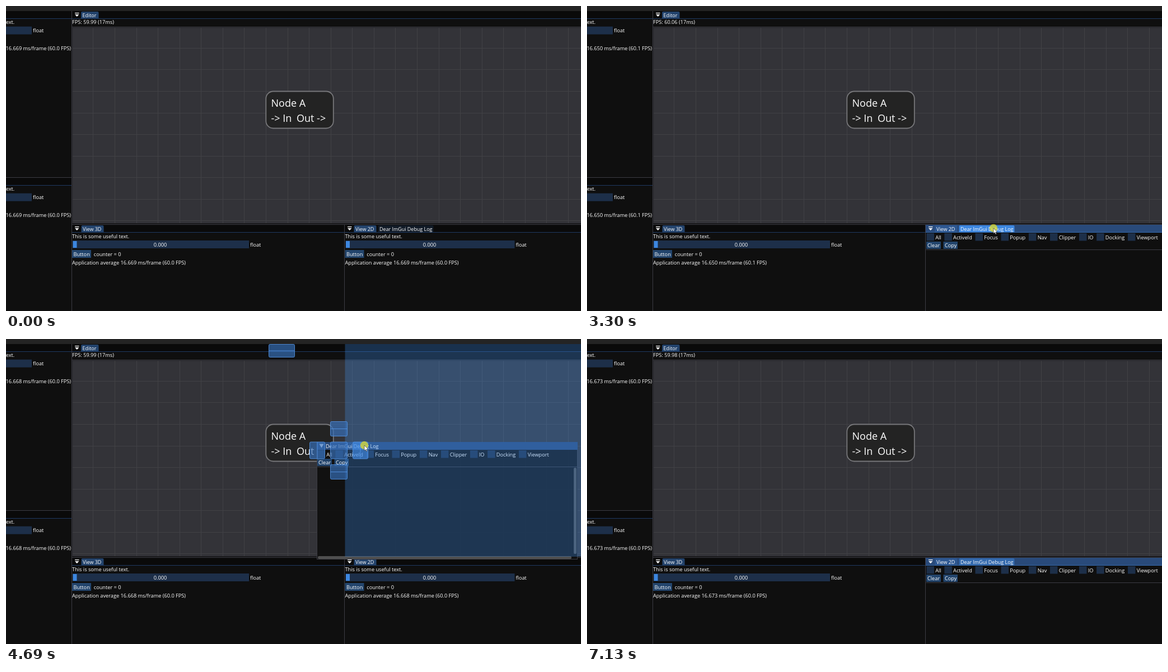
Animation of 1027 by 545 pixels, one loop 7210 ms. Source, as an HTML page with a canvas:

```html
<!DOCTYPE html>
<html lang="en">
<head>
<meta charset="utf-8">
<title>Docking demo</title>
<style>
  html, body { margin: 0; width: 100%; height: 100%; overflow: hidden; background: #0f0f0f; }
  canvas { display: block; }
</style>
</head>
<body>
<canvas id="stage" width="1027" height="545"></canvas>
<script>
const g = document.getElementById('stage').getContext('2d');
const W = 1027, H = 545, LOOP = 7210;
const BG = '#0f0f0f', BAR = '#0a0a0a', BORDER = '#3b3b43', FRAME = '#1d2f49', BUTTON = '#23456d';
const TAB = '#23436c', LINE = '#1e3961', FOCUS = '#294a7a', ACTIVE = '#3369ad', HOVER = '#3d87e0';
const LOG = 'Dear ImGui Debug Log', TAB_SIZE = 8.95, GRID = 38.57;

// When things happen, in ms
const showLogAt = 1250, showViewAt = 1850, showLogAgainAt = 2700, undockAt = 3740, dropAt = 6400;
const LAG = 60;     // the pointer trails the dragged window
const TRAVEL = 450; // longest pointer move

// Pointer stops: arrival time, x, y
const stops = [
  [0, 985, 570], [900, 722, 398], [1990, 647, 394], [2650, 726, 397], [4135, 716, 392],
  [4285, 740, 370], [4690, 640, 190], [5210, 698, 387], [5450, 720, 439], [6000, 838, 496],
  [6860, 870, 570]
];
// Measured frame durations: time, ms per frame
const readings = [
  [0, 16.669], [1990, 17.533], [3300, 16.65], [4210, 16.684], [4690, 16.6684],
  [5330, 17.0724], [7130, 16.673]
];

const mix = (a, b, u) => a + (b - a) * u;
const ease = u => u * u * (3 - 2 * u);

function around(keys, t) {
  const i = keys.findIndex(k => k[0] > t);
  return i < 0 ? [keys.at(-1), keys.at(-1)] : [keys[i - 1], keys[i]];
}

function pointerAt(t) {
  const [a, b] = around(stops, t);
  const travel = Math.min(TRAVEL, b[0] - a[0]) || 1;
  const u = ease(Math.min(1, Math.max(0, 1 - (b[0] - t) / travel)));
  return [mix(a[1], b[1], u), mix(a[2], b[2], u)];
}

// The screen refreshes at an even pace between two readings
function refresh(t) {
  const [a, b] = around(readings, t), span = b[0] - a[0];
  if (!span) return [a[0], a[1]];
  const steps = Math.round(span / 69.2), u = Math.floor((t - a[0]) / span * steps) / steps;
  return [a[0] + u * span, mix(a[1], b[1], u)];
}

function rect(x, y, w, h, color) {
  g.fillStyle = color;
  g.fillRect(x, y, w, h);
}

function rounded(x, y, w, h, r, fill, stroke, width = 1) {
  g.beginPath();
  g.roundRect(x, y, w, h, r);
  g.fillStyle = fill;
  g.fill();
  if (stroke) {
    g.strokeStyle = stroke;
    g.lineWidth = width;
    g.stroke();
  }
}

function text(s, x, y, size = 9.2, align = 'left') {
  g.font = `${size}px "Open Sans", "Noto Sans", sans-serif`;
  g.textAlign = align;
  g.fillStyle = '#fff';
  g.fillText(s, x, y);
  return g.measureText(s).width;
}

function polygon(points, color) {
  g.beginPath();
  points.forEach(([x, y]) => g.lineTo(x, y));
  g.closePath();
  g.fillStyle = color;
  g.fill();
}

function clip(x, y, w, h, draw) {
  g.save();
  g.beginPath();
  g.rect(x, y, w, h);
  g.clip();
  draw();
  g.restore();
}

function tabBar(x, y, w, bar = BAR, line = LINE) {
  rect(x, y, w, 13, bar);
  rect(x, y + 13, w, 1, line);
  rect(x + 5, y + 3, 7.5, 1.3, '#fff');
  polygon([[x + 5, y + 6], [x + 12.5, y + 6], [x + 8.7, y + 10]], '#fff');
}

function tab(label, x, y, w, color = TAB) {
  rounded(x, y + 1, w, 12, [2, 2, 0, 0], color);
  text(label, x + 2.5, y + 11, TAB_SIZE);
}

function demoPanel(x, y, sliderWidth, ms) {
  text('This is some useful text.', x, y + 3.5);
  rect(x + 1, y + 8, sliderWidth, 14, FRAME);
  rect(x + 1.5, y + 9, 7, 12, HOVER);
  text('0.000', x + sliderWidth / 2, y + 18.5, 9.2, 'center');
  text('float', x + sliderWidth + 3, y + 18.5);
  rect(x, y + 25, 34, 14, BUTTON);
  text('Button', x + 2.5, y + 35.5);
  text('counter = 0', x + 38.8, y + 35.5);
  text(`Application average ${ms.toFixed(3)} ms/frame (${(1000 / ms).toFixed(1)} FPS)`, x, y + 50.7);
}

function logPanel(x, y, w) {
  let left = x + 1;
  for (const label of 'All ActiveId Focus Popup Nav Clipper IO Docking Viewport'.split(' ')) {
    rect(left, y + 15, 13.5, 13.5, FRAME);
    left += 21.4 + text(label, left + 15.7, y + 25.5);
  }
  rect(x + 0.5, y + 30, 26, 13, BUTTON);
  text('Clear', x + 2.5, y + 40.3);
  rect(x + 31, y + 30, 25.5, 13, BUTTON);
  text('Copy', x + 33.5, y + 40.3);
  rect(x, y + 44, w, 1, BORDER);
}

function editor(ms) {
  tabBar(118, 9, W);
  tab('Editor', 134, 9, 31.5);
  text(`FPS: ${(1000 / ms).toFixed(2)} (${Math.round(ms)}ms)`, 118, 32);
  rect(118, 37, W, 1, BORDER);
  rect(118.5, 38.5, W, 350, '#333338');
  for (let x = 464 - 8 * GRID; x < W; x += GRID) rect(Math.round(x), 39, 1, 349, '#414145');
  for (let y = 152 - 2 * GRID; y < 388; y += GRID) rect(119, Math.round(y), W, 1, '#414145');
  rounded(464.3, 152.5, 120.5, 66, 13, '#232323', '#77777a', 1.8);
  text('Node A', 473.5, 180, 18);
  text('-> In', 473.5, 206.5, 18);
  text('Out ->', 519, 206.5, 18);
}

function floatingLog(x, y) {
  rect(x, y, 466, 210, 'rgba(15,15,15,.94)');
  g.strokeStyle = BORDER;
  g.lineWidth = 1;
  g.strokeRect(x + 0.5, y + 0.5, 465, 209);
  rect(x, y, 466, 14, FOCUS);
  polygon([[x + 4.5, y + 3.5], [x + 12.5, y + 3.5], [x + 8.5, y + 10.5]], '#fff');
  text(LOG, x + 16, y + 10.7, TAB_SIZE);
  logPanel(x + 0.5, y, 465);
  rounded(x + 459, y + 46, 5, 154, 2, '#4f4f4f');
  rounded(x + 2, y + 204, 453, 5, 2, '#4f4f4f');
}

function dropTarget(cx, cy, w, h, split, hot) {
  const edge = 'rgba(85,148,228,.85)';
  rounded(cx - w / 2, cy - h / 2, w, h, 2, hot ? 'rgba(66,140,230,.65)' : 'rgba(55,112,185,.68)', edge);
  if (split === 'row') rect(cx - w / 2, cy - 0.5, w, 1, edge);
  if (split === 'column') rect(cx - 0.5, cy - h / 2, 1, h, edge);
}

function dropTargets(px, py) {
  const inEditor = py < 405;
  const [cx, cy] = inEditor ? [594.5, 199] : [838, 496];
  const [x, y, w, h] = inEditor ? [118, 9, 954, 380] : [605, 391, 466, 212];
  const over = (tx, ty) => Math.abs(px - tx) < 15 && Math.abs(py - ty) < 15;
  const preview = 'rgba(66,150,250,.28)';
  if (over(cx, cy)) rect(x, y, w, h, preview);
  if (over(cx + 38.5, cy)) rect(x + w / 2 + 10.5, y, w / 2, h, preview);
  dropTarget(492.5, 21, 46, 23, 'row');
  dropTarget(cx, cy, 30, 30, '', over(cx, cy));
  for (const d of [-38.5, 38.5]) {
    dropTarget(cx, cy + d, 30, 26, 'row', over(cx, cy + d));
    dropTarget(cx + d, cy, 27, 30, 'column', over(cx + d, cy));
  }
}

function drawPointer(x, y) {
  g.beginPath();
  g.arc(x, y, 7.2, 0, 7);
  g.fillStyle = 'rgba(235,225,30,.7)';
  g.fill();
  const arrow = [[0, 0], [0, 9.5], [2.2, 7.6], [3.8, 11], [5.3, 10.3], [3.8, 7], [6.8, 6.8]];
  polygon(arrow.map(([dx, dy]) => [x + dx, y + dy]), '#fff');
  g.strokeStyle = '#222';
  g.lineWidth = 0.6;
  g.stroke();
}

function render([t, ms]) {
  const [px, py] = pointerAt(t);
  const floating = t >= undockAt && t < dropAt;
  const focused = t >= showLogAt && !floating;
  const showLog = focused && (t < showViewAt || t >= showLogAgainAt);

  rect(0, 0, W, H, BG);
  rect(0, 0, W, 9, '#242424');
  clip(0, 9, 117, H, () => {
    for (const y of [9, 307]) {
      rect(0, y - 1, 117, 1, y > 9 ? BORDER : BAR);
      tabBar(-87, y, 220);
      demoPanel(-87, y + 19.7, 132, ms);
    }
  });
  editor(ms);
  rect(118, 390, W, 1, BORDER);
  tabBar(118, 391, 486);
  tab('View 3D', 134.5, 391, 40);
  demoPanel(118, 411, 315, ms);

  const dockedTab = (label, x, w, active) => {
    const hovered = focused && py > 391 && py < 405 && px > x && px < x + w;
    const color = focused ? (active ? ACTIVE : '#2d5791') : (active ? TAB : '#111a26');
    tab(label, x, 391, w, hovered ? HOVER : color);
  };
  tabBar(605, 391, W, focused ? FOCUS : BAR, focused ? ACTIVE : LINE);
  dockedTab('View 2D', 621.5, 40, !showLog);
  if (!floating) dockedTab(LOG, 664.5, 99, showLog);
  if (showLog) logPanel(605.5, 391, W);
  else demoPanel(605.5, 411, 302, ms);
  rect(117, 9, 1, H, BORDER);
  rect(604, 391, 1, H, BORDER);

  if (floating) {
    const [mx, my] = pointerAt(t + LAG);
    floatingLog(Math.round(mx - 85), Math.round(my - 6));
    dropTargets(mx, my);
  }
  drawPointer(px, py);
}

const start = performance.now();
function tick() {
  render(refresh((performance.now() - start) % LOOP));
  requestAnimationFrame(tick);
}
tick();
</script>
</body>
</html>
```
